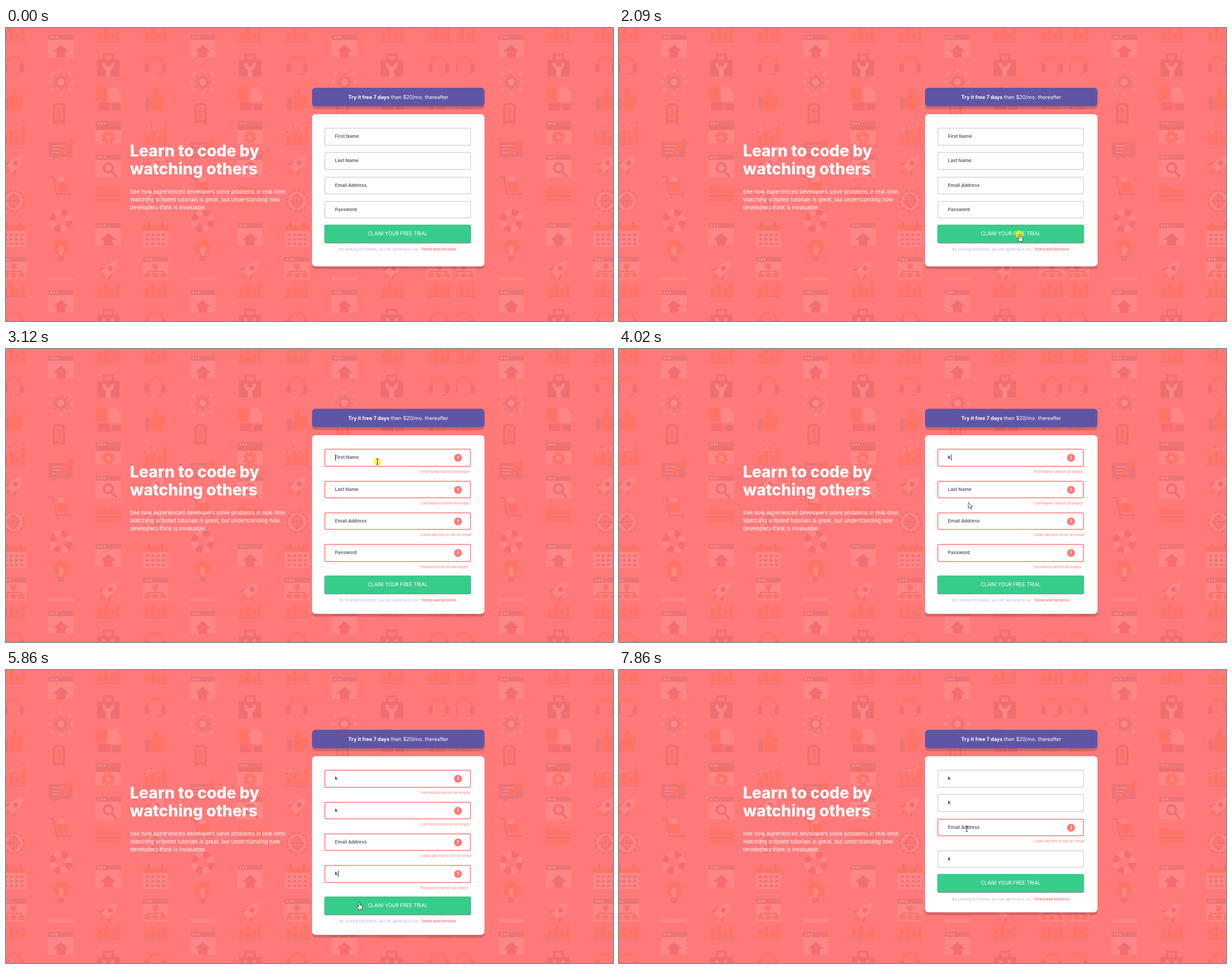
Recreate the animation shown at these times as an HTML page. Size 1077x520 px, loop 8000 ms.

```html
<!DOCTYPE html>
<html lang="en">
<head>
<meta charset="utf-8">
<title>Sign-up form</title>
<style>
  html, body { margin: 0; width: 100%; height: 100%; overflow: hidden; }
  body {
    position: relative; background: #ff7979; color: #fff;
    font: 9.55px/14.2px Inter, "Open Sans", sans-serif; font-optical-sizing: none;
  }
  body > *, .field > * { position: absolute; margin: 0; white-space: nowrap; box-sizing: border-box; }
  #bg { left: 0; top: 0; width: 100%; height: 100%; }
  h1 { left: 220px; top: 202px; font: 800 28.1px/32px Inter, "Open Sans", sans-serif; }
  .intro { left: 220px; top: 283.6px; }
  .banner {
    left: 543px; top: 106px; width: 306px; height: 33px; border-radius: 6px;
    background: #6055a5; box-shadow: 0 5px 0 rgba(0, 0, 0, .16);
    font-size: 9px; line-height: 33px; text-align: center;
  }
  .banner b { font-weight: 700; }
  #card {
    left: 543px; top: 153px; width: 306px; border-radius: 6px;
    background: #fff; box-shadow: 0 5px 0 rgba(0, 0, 0, .16);
  }
  .field {
    left: 565px; width: 260px; height: 31.5px; border-radius: 3px; box-shadow: inset 0 0 0 1.5px #d6d6d6;
    color: #3d3b48; font: 700 8.1px/31px Inter, "Open Sans", sans-serif;
  }
  .text { left: 18.6px; }
  .empty .text { color: #6d6b75; }
  .caret { top: 10px; width: 1px; height: 11px; background: #333; }
  .icon {
    right: 16px; top: 9px; width: 14px; height: 14px; border-radius: 50%;
    background: #ff7979; color: #fff; font-size: 9.5px; line-height: 14px; text-align: center;
  }
  .note { left: 170.5px; top: 34.5px; color: #ff7979; font: italic 400 6.5px/12px Inter, "Open Sans", sans-serif; }
  .icon, .note { display: none; }
  .bad { box-shadow: inset 0 0 0 1.5px #ff7979; }
  .bad .icon, .bad .note { display: block; }
  #button {
    left: 565px; width: 260px; height: 32px; border-radius: 3px; background: #38cc8b;
    box-shadow: 0 1px 1.5px rgba(0, 0, 0, .6);
    font-size: 8.8px; line-height: 32px; text-align: center;
  }
  #terms { left: 591.5px; color: #bab7c9; font-size: 6.45px; line-height: 10px; }
  #terms b { margin-left: 3px; color: #ff7979; font-weight: 700; }
  #mouse { left: 0; top: 0; width: 1px; height: 1px; overflow: visible; }
  #mouse > g { display: none; }
  .L { fill: #ff9997 } .G { fill: #d06c72 } .R { fill: #e8595f } .O { fill: #ff6a4c } .D { fill: #d65f64 }
  .l, .g, .r, .o, .d { fill: none; stroke-width: 4 }
  .l { stroke: #ff9997 } .g { stroke: #d06c72 } .r { stroke: #e8595f } .o { stroke: #ff6a4c } .d { stroke: #d65f64 }
</style>
</head>
<body>
<svg id="bg">
  <defs>
    <g id="win">
      <path class="L" d="M-22.500-20h45v40h-45z"/><path class="G" d="M-22.500-20h45v9h-45z"/>
      <path d="M-17-15.500h0m5 0h0m5 0h0" stroke="#ffe4e2" stroke-width="2.400" stroke-linecap="round"/>
    </g>
    <g id="house">
      <use href="#win"/><path class="R" d="M0-2L14 10H8V20H-8V10H-14z"/><path class="D" d="M0-2L14 10H9L0 3L-9 10H-14z"/>
    </g>
    <g id="bars">
      <path class="O" d="M-19 14V0h8v14zM-8 14V-8H0v22zM3 14V2h8v12zM13 14v-28h7v28z"/><path class="G" d="M-22 15h44v2h-44z"/>
    </g>
    <g id="chart">
      <use href="#bars" y="4"/>
      <path class="l" d="M-18-2l11-9 11 7 14-14" style="stroke-width:2"/>
      <path class="d" d="M-18-2h0m11-9h0m11 7h0m14-14h0" stroke-linecap="round"/>
    </g>
    <g id="phones">
      <path class="o" d="M-15 6A15 17 0 0 1 15 6"/><path class="R" d="M-19 2h8v14h-8zM11 2h8v14h-8z"/>
      <path class="g" style="stroke-width:2" d="M15 15q-2 6-12 5"/>
    </g>
    <g id="thumb">
      <path class="G" d="M-18-2h9v22h-9z"/>
      <path class="O" d="M-8 0L1-21q7 2 4 15h12q3 4 0 8 1 5-2 8 0 7-4 10H-3l-5-3z"/>
    </g>
    <g id="rocket" transform="rotate(45)">
      <path class="L" d="M0-23Q12-10 8 10H-8Q-12-10 0-23z"/><circle class="R" cy="-5" r="4.500"/>
      <path class="R" d="M-8-1l-7 14 7-3zM8-1l7 14-7-3z"/><path class="O" d="M-5 12H5L0 23z"/>
    </g>
    <g id="gear">
      <circle class="g" r="18" stroke-dasharray="6 3.400"/><circle class="l" r="14"/>
      <path class="d" style="stroke-width:2" d="M-13 0h26M0-13v26M0-13q-14 13 0 26 14-13 0-26"/>
    </g>
    <g id="calendar">
      <path class="L" d="M-22-16h44v35h-44z"/><path class="O" d="M-22-20h44v10h-44z"/>
      <path class="g" stroke-dasharray="6 3.500" d="M-17-3h36M-17 5h36M-17 13h36"/><path class="d" d="M-12-25v8M12-25v8"/>
    </g>
    <g id="org">
      <use href="#win"/><path class="d" style="stroke-width:2" d="M0-2v9M-14 14V6h28v8"/>
      <path class="O" d="M-5-8H5v9H-5zM-19 9h10v8h-10zM-5 9H5v8H-5zM9 9h10v8H9z"/>
    </g>
    <g id="cell">
      <path class="g" style="stroke-width:2" d="M-16-14l32 28M-16 14l32-28M0-20v40M-20 0h40"/><circle class="G" r="11"/><circle class="L" r="6"/>
      <path class="l" style="stroke-width:7" stroke-linecap="round" d="M-16-14h0m32 28h0m-32 0h0m32-28h0M0-20h0m0 40h0M-20 0h0m40 0h0"/>
    </g>
    <g id="device">
      <rect class="d" x="-9" y="-17" width="18" height="31" rx="5"/><path class="O" d="M-4-11h8v20h-8z"/><path class="R" d="M-11 11h6v7h-6zM5 11h6v7H5z"/>
    </g>
    <g id="note">
      <path class="G" d="M-22-15h42v27H-6l-8 7v-7h-8z"/><path class="l" style="stroke-width:2" d="M-16-8h22M-16-2h16M-16 4h24"/>
      <path class="O" d="M17-21l6 6L4 5-4 7l2-8z"/>
    </g>
    <g id="cart">
      <path class="d" style="stroke-width:2.500" d="M-22-18h9l5 31h28"/><path class="O" d="M-8-9h19V8H-6z"/><path class="L" d="M-6-18H6v9H-6z"/>
      <path class="g" stroke-linecap="round" d="M-5 18h0m20 0h0"/>
    </g>
    <g id="buoy">
      <circle class="l" r="15" style="stroke-width:11"/><circle class="r" r="15" style="stroke-width:11" stroke-dasharray="11.780"/>
    </g>
    <g id="bulb">
      <circle class="O" cy="-4" r="14"/><path class="L" d="M-5 0Q0-15 5 0L3 10h-6z"/><path class="G" d="M-6 11H6v7l-3 3h-6l-3-3z"/>
    </g>
    <g id="case">
      <rect class="d" x="-8" y="-22" width="16" height="12"/><rect class="D" x="-20" y="-13" width="40" height="30" rx="2"/>
      <path class="L" d="M-4 17V5q-8-4-6-13l5 2v5H5v-5l5-2Q12 1 4 5v12z"/>
    </g>
    <g id="docs">
      <path class="O" d="M-22-20H-3V4h-19z"/><path class="L" d="M0-20h14l8 9V6H0z"/><path class="R" d="M-18 7H3v14h-21z"/><path class="D" d="M6 9h16v12H6z"/>
    </g>
    <g id="setup">
      <use href="#win"/><path class="D" d="M-22-11h44v7h-44z"/><circle class="o" cy="9" r="10" stroke-dasharray="5 2.850"/><circle class="o" cy="9" r="6.500"/>
    </g>
    <g id="search">
      <use href="#win"/><circle class="d" cy="3" r="8"/><path class="d" d="M6 10l9 9"/>
    </g>
    <g id="folders">
      <path class="O" d="M-22-12h16l4 4h24v9h-44z"/><path class="D" d="M-22 3h44v3h-44z"/><path class="O" d="M-22 8h44v7h-44z"/>
    </g>
    <g id="cols">
      <use href="#bars" x="13.500" y="8"/><use href="#phones" x="13.500" y="62"/><use href="#thumb" x="13.500" y="125"/>
      <use href="#chart" x="13.500" y="186"/><use href="#rocket" x="13.500" y="243"/><use href="#gear" x="13.500" y="307"/>
      <use href="#calendar" x="13.500" y="370"/><use href="#org" x="13.500" y="426"/>
      <use href="#house" x="97.500" y="32"/><use href="#cell" x="97.500" y="96"/><use href="#device" x="94" y="152"/>
      <use href="#note" x="97.500" y="217"/><use href="#cart" x="97.500" y="282"/><use href="#buoy" x="97.500" y="342"/>
      <use href="#bulb" x="97.500" y="393"/><path class="L" d="M75 442h45v6H75z"/>
      <use href="#bars" x="181.500" y="8"/><use href="#case" x="181.500" y="69"/><use href="#docs" x="181.500" y="125"/>
      <use href="#setup" x="181.500" y="185"/><use href="#search" x="181.500" y="245"/><use href="#folders" x="181.500" y="293"/>
      <use href="#house" x="181.500" y="366"/><use href="#rocket" x="181.500" y="430"/>
    </g>
    <pattern id="tile" width="799" height="453" patternUnits="userSpaceOnUse">
      <use href="#cols"/><use href="#cols" x="251.500"/><use href="#cols" x="503"/><use href="#cols" x="754.500"/>
    </pattern>
  </defs>
  <rect width="100%" height="100%" fill="url(#tile)" opacity=".4"/>
</svg>

<h1>Learn to code by<br>watching others</h1>
<p class="intro">See how experienced developers solve problems in real-time.<br>Watching scripted tutorials is great, but understanding how<br>developers think is invaluable.</p>
<div class="banner"><b>Try it free 7 days</b> then $20/mo. thereafter</div>
<div id="card"></div>
<div id="button">CLAIM YOUR FREE TRIAL</div>
<div id="terms">By clicking the button, you are agreeing to our <b>Terms and Services</b></div>

<svg id="mouse">
  <circle id="halo" r="7" fill="#fff000" opacity=".65"/>
  <g id="arrow"><path d="M0 0V10.500L2.500 8.200 4.200 12 5.900 11.200 4.200 7.600H7.500z" fill="#fff" stroke="#222" stroke-width=".8"/></g>
  <g id="beam"><path d="M-2-5Q0-5 0-3.500V3.500Q0 5-2 5M2-5Q0-5 0-3.500M2 5Q0 5 0 3.500" fill="none" stroke="#222" stroke-width=".9"/></g>
  <g id="hand"><path d="M0 1.500a1.200 1.200 0 0 1 2.400 0V5l3.200 1q1.200.4 1 2L5.800 12.800H.2L-3 8.600q0-1.800 1.800-.8L0 9z" fill="#fff" stroke="#222" stroke-width=".8"/></g>
</svg>

<script>
  const LOOP = 8000, STEP = 68.57, LEAD = 160;
  const $ = id => document.getElementById(id);
  const inside = (t, [from, to]) => t >= from && t < to;

  // label, error text, time at which the letter is typed
  const fields = [
    ["First Name", "First Name cannot be empty", 3600],
    ["Last Name", "Last Name cannot be empty", 4400],
    ["Email Address", "Looks like this is not an email", Infinity],
    ["Password", "Password cannot be empty", 5720],
  ].map(([label, note, typed]) => {
    const el = document.createElement("div");
    el.innerHTML = `<span class="text"></span><span class="caret"></span><span class="icon">!</span><span class="note">${note}</span>`;
    $("button").before(el);
    return { el, label, typed, text: el.children[0], caret: el.children[1] };
  });

  const carets = [[3100, 4080, 0], [4080, 5100, 1], [5570, 6250, 3]];
  const clicks = [[2080, 2150], [3100, 3240], [5570, 5640], [6390, 6460]];
  const path = [
    [180, 1030, 508], [450, 880, 370], [740, 691, 199], [920, 709, 238], [1540, 710, 366],
    [2350, 710, 366], [2980, 659, 200], [3600, 659, 200], [3880, 624, 264], [4690, 600, 311],
    [4895, 600, 401], [4925, 600, 401], [5050, 641, 416], [5450, 620, 360], [5720, 620, 360],
    [5860, 625, 412], [6210, 642, 415], [6420, 642, 415], [6560, 644, 416], [6650, 644, 416],
    [6900, 505, 402], [7000, 465, 377], [7080, 482, 362], [7180, 567, 326], [7660, 617, 283], [7860, 617, 282],
  ];

  function pointAt(t) {
    const i = path.findIndex(p => p[0] > t);
    if (i < 0) return path.at(-1).slice(1);
    const [t0, x0, y0] = path[i - 1], [t1, x1, y1] = path[i];
    const k = (t - t0) / (t1 - t0);
    return [x0 + (x1 - x0) * k, y0 + (y1 - y0) * k];
  }

  function drawForm(t) {
    const caret = carets.find(c => inside(t, c));
    let y = 177.3, errors = 0;
    const tops = fields.map((f, i) => {
      const top = y;
      const bad = t >= 2150 && (t < 6460 || i === 2);
      const typed = t >= f.typed;
      f.el.className = "field" + (bad ? " bad" : "") + (typed ? "" : " empty");
      f.el.style.top = top + "px";
      f.text.textContent = typed ? "k" : f.label;
      f.caret.style.left = (typed ? 23.5 : 18.6) + "px";
      f.caret.style.display = caret && caret[2] === i ? "block" : "none";
      y += 43.1 + (bad ? 13.2 : 0);
      errors += bad;
      return top;
    });
    const button = y - .7;
    $("button").style.top = button + "px";
    $("terms").style.top = y + 38.7 + "px";
    $("card").style.height = 270 + (errors ? errors * 13.2 - 6 : 0) + "px";
    return { tops, button };
  }

  function drawMouse(t, form) {
    $("mouse").style.display = t < 180 ? "none" : "block";
    if (t < 180) return;
    const [x, y] = pointAt(t);
    const over = (top, h) => x >= 565 && x <= 825 && y >= top && y <= top + h;
    const shape = over(form.button, 32) ? "hand" : form.tops.some(top => over(top, 31.5)) ? "beam" : "arrow";
    for (const id of ["arrow", "beam", "hand"]) $(id).style.display = id === shape ? "inline" : "none";
    $("halo").style.display = clicks.some(c => inside(t, c)) ? "inline" : "none";
    $("mouse").style.transform = `translate(${x}px, ${y}px)`;
  }

  const start = performance.now();
  function frame() {
    const now = (performance.now() - start) % LOOP;
    const t = now < LEAD ? 0 : LEAD + 20 + Math.floor((now - LEAD) / STEP) * STEP;
    drawMouse(t, drawForm(t));
    requestAnimationFrame(frame);
  }
  frame();
</script>
</body>
</html>
```
